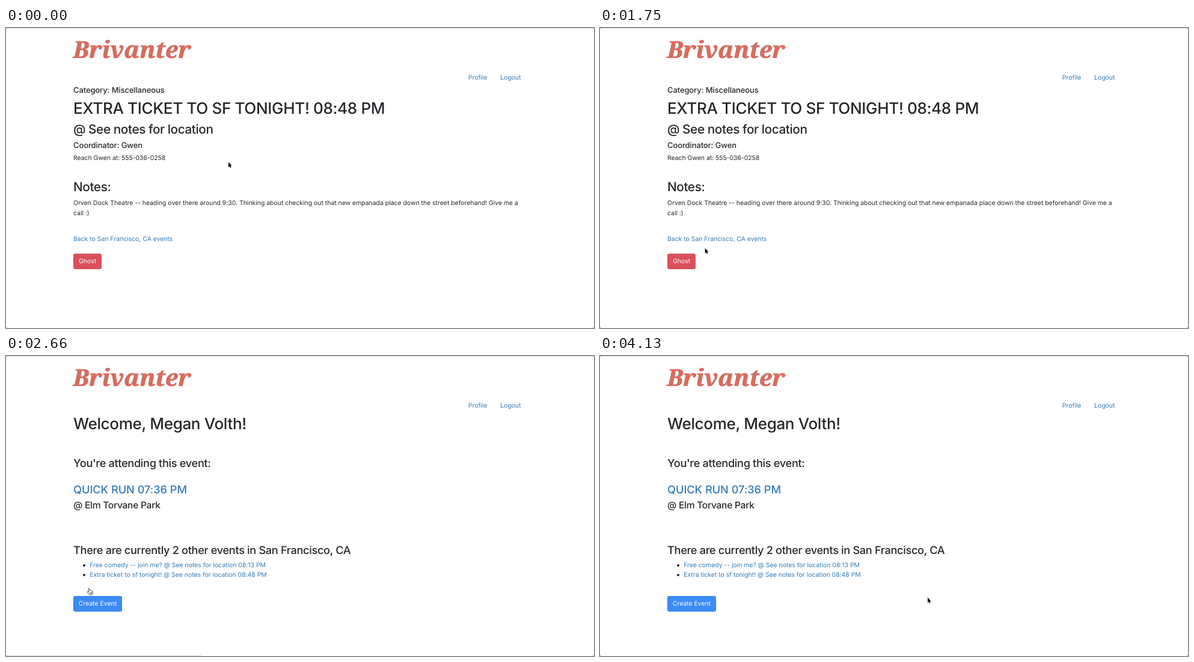
Recreate the animation shown at these times as an HTML page. Size 978 px wide and 500 px high, loop 4200 ms.

```html
<!DOCTYPE html>
<html lang="en">
<head>
<meta charset="utf-8">
<title>Event page</title>
<style>
  html, body { margin: 0; width: 100%; height: 100%; overflow: hidden; background: #8b8b8b; }
  #stage {
    position: relative; width: 978px; height: 500px; overflow: hidden;
    background: #fff; border-radius: 3px; box-shadow: inset 0 1px #dcdcdc;
    font: 10.45px Inter, "Open Sans", sans-serif; font-optical-sizing: none;
    text-rendering: geometricPrecision; color: #25282b;
  }
  .t { position: absolute; line-height: 0; white-space: pre; letter-spacing: -.01px; }
  .h1, .h2, .h3, .h4, .h5 { font-weight: 500; }
  .h1 { font-size: 26.1px; letter-spacing: -.38px; }
  .h2 { font-size: 20.85px; letter-spacing: -.46px; }
  .h3 { font-size: 18.2px; letter-spacing: -.34px; }
  .h4 { font-size: 15.6px; letter-spacing: -.28px; }
  .h5 { font-size: 13px; letter-spacing: -.11px; }
  .caps { letter-spacing: -.03px; }
  .link { color: #337ab7; }
  .brand {
    font: italic 900 39.2px "Noto Serif", serif; line-height: 0; letter-spacing: 0;
    color: #e1685a; text-shadow: -1px 0 #8d8880;
  }
  .btn {
    position: absolute; left: 112px; height: 26px; box-sizing: border-box;
    border-radius: 2.7px; border: 1px solid; color: #fff;
    line-height: 24px; text-align: center;
  }
  #ghost { top: 376px; width: 47px; background: #d9505a; border-color: #cb575f; }
  #ghost.hover { background: #c13b44; border-color: #b0363e; }
  #ghost.focus { box-shadow: 0 0 0 2px rgba(220, 53, 69, .45); }
  #create { top: 400px; width: 81px; background: #3c8bf7; border-color: #357fe6; }
  .dot { position: absolute; left: 128px; width: 4px; height: 4px; border-radius: 50%; background: #25282b; }
  #status { position: absolute; left: 0; top: 499px; width: 325px; height: 1px; background: #d4d4d4; }
  #cursor { position: absolute; left: 0; top: 0; overflow: visible; }
</style>
</head>
<body>
<div id="stage">
  <div id="event"></div>
  <div id="home"></div>
  <div id="status"></div>
  <svg id="cursor" width="12" height="14">
    <path id="arrow" d="M0 .5V9L1.8 7.4L3.1 10.2L4.5 9.6L3.3 6.8H5.7Z"
          fill="#000" stroke="#fff" stroke-width=".8" paint-order="stroke"/>
    <path id="hand" d="M-1 1.2Q-1 0 0 0Q1 0 1.1 1.2L1.4 4Q2.4 3.2 3.2 4.2Q4.2 3.6 4.8 4.6Q6.1 4.3 6.1 5.8V7.6Q6 9 5.2 9.8V11H.3V10Q-1 8.8-2.8 6.4Q-3.2 5.2-2 5.2L-.5 6.3Z M1.7 7V9M3.2 7V9M4.5 7V9"
          fill="#fff" stroke="#222" stroke-width=".8" stroke-linejoin="round"/>
  </svg>
</div>
<script>
const $ = id => document.getElementById(id);
const LOOP = 4200, STEP = 70, LEFT = 112;

function add(parent, cls, text, props) {
  const el = document.createElement('div');
  el.className = cls;
  el.textContent = text;
  Object.assign(el.style, props);
  parent.append(el);
  return el;
}

// y is the middle of the line
const put = (parent, y, cls, text, x = LEFT) =>
  add(parent, 't ' + cls, text, { left: x + 'px', top: y + 'px' });

const stage = $('stage'), eventPage = $('event'), home = $('home');
stage.insertBefore(put(stage, 36, 'brand', 'Brivanter'), eventPage);
stage.insertBefore(put(stage, 82.5, 'link', 'Profile', 768.8), eventPage);
stage.insertBefore(put(stage, 82.5, 'link', 'Logout', 822), eventPage);

[
  [104, 'h5', 'Category: Miscellaneous'],
  [135.2, 'h1', 'EXTRA TICKET TO SF TONIGHT! 08:48 PM'],
  [169.6, 'h2', '@ See notes for location'],
  [195.5, 'h5', 'Coordinator: Gwen'],
  [217.4, '', 'Reach Gwen at: 555-036-0258'],
  [266.4, 'h2', 'Notes:'],
  [292.4, '', 'Orven Dock Theatre -- heading over there around 9:30. Thinking about checking out that new empanada place down the street beforehand! Give me a'],
  [308.5, '', 'call :)'],
  [352, 'link', 'Back to San Francisco, CA events']
].forEach(row => put(eventPage, ...row));
const ghost = add(eventPage, 'btn', 'Ghost');
ghost.id = 'ghost';

[
  [113.6, 'h1', 'Welcome, Megan Volth!'],
  [178.7, 'h3', "You're attending this event:"],
  [222.8, 'h3 caps link', 'QUICK RUN 07:36 PM'],
  [249, 'h4', '@ Elm Torvane Park'],
  [324.3, 'h3', 'There are currently 2 other events in San Francisco, CA'],
  [348.7, 'link', 'Free comedy -- join me? @ See notes for location 08:13 PM', 139.2],
  [365, 'link', 'Extra ticket to sf tonight! @ See notes for location 08:48 PM', 139.2]
].forEach(row => put(home, ...row));
[346.8, 363].forEach(y => add(home, 'dot', '', { top: y + 'px' }));
add(home, 'btn', 'Create Event').id = 'create';

// pointer path: time, x, y
const path = [
  [0, 370, 223], [560, 370, 223], [1260, 198.5, 353], [1540, 198.5, 353],
  [2030, 138, 387], [2730, 138, 387], [3640, 395, 391], [3710, 395, 391],
  [4130, 545, 402], [LOOP, 545, 402]
];
const PRESS = 2450, LOAD = 2660, LEAVE = 2800;

function pointer(t) {
  const i = path.findIndex(p => p[0] > t);
  const [t0, x0, y0] = path[i - 1], [t1, x1, y1] = path[i];
  const u = (t - t0) / (t1 - t0), e = u * u * (3 - 2 * u);
  return [x0 + (x1 - x0) * e, y0 + (y1 - y0) * e];
}

const inside = (x, y, l, t, r, b) => x >= l && x <= r && y >= t && y <= b;
const show = (el, on) => { el.style.display = on ? '' : 'none'; };

function draw(now) {
  const t = Math.floor((now % LOOP) / STEP) * STEP;
  const [x, y] = pointer(t);
  const loaded = t >= LOAD;
  const onButton = !loaded && inside(x, y, 112, 376, 159, 402);
  const onLink = !loaded && inside(x, y, 112, 345, 277, 359);
  const hand = onButton || onLink || (loaded && t < LEAVE);

  show(eventPage, !loaded);
  show(home, loaded);
  show($('status'), t >= 2520 && t < 2730);
  ghost.classList.toggle('hover', onButton);
  ghost.classList.toggle('focus', t >= PRESS);
  show($('hand'), hand);
  show($('arrow'), !hand);
  $('cursor').style.transform = `translate(${x}px, ${y}px)`;
}

function tick() {
  draw(performance.now());
  requestAnimationFrame(tick);
}
tick();
</script>
</body>
</html>
```
